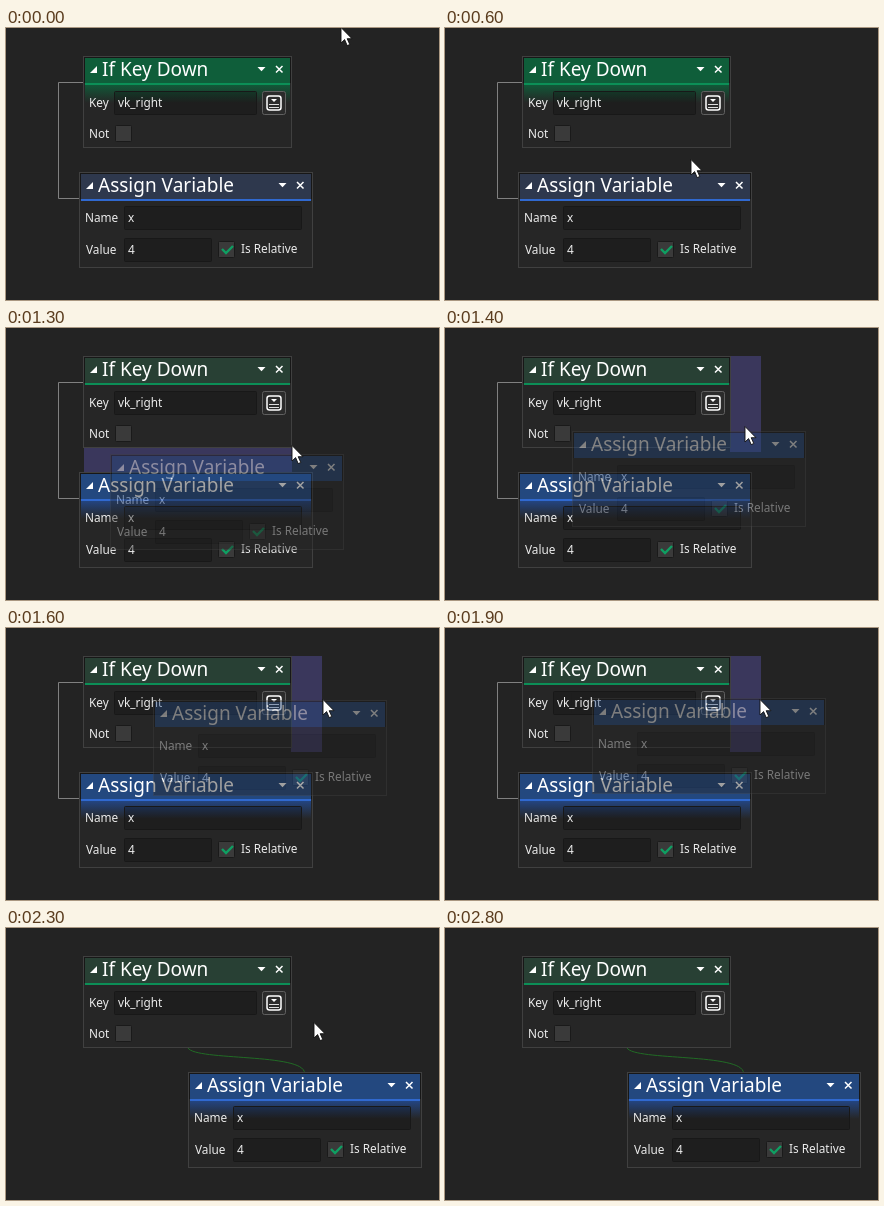
Write an HTML page that moves like this. It is 433 px wide and 272 px high and loops after 3200 ms.

```html
<!DOCTYPE html>
<html>
<head>
<meta charset="utf-8">
<style>
  html, body { margin: 0; width: 100%; height: 100%; overflow: hidden; background: #232323; }
  svg { display: block; }
  text { font: 11.8px "Noto Sans", "Open Sans", sans-serif; fill: #ececec; }
  .title { font-size: 19px; fill: #fff; }
  .icon { fill: #fff; }
  .stroke { fill: none; stroke: #fff; stroke-width: 1.5; }
  .thin { fill: none; stroke: #ddd; stroke-width: 1; }
  .field { fill: #000; fill-opacity: .22; stroke: #181818; }
  .check { fill: #3a3a3a; stroke: #1a1a1a; }
  .body { fill: #262626; stroke: #404040; }
  .edge { fill: #171717; }
  #keydown { --idle: #284034; --active: #0f5e3a; --accent: #0c8f57; }
  #assign { --idle: #2e384d; --active: #23487f; --accent: #3069d0; }
  #ghost { --lit: 0; opacity: .42; }
  .head { fill: var(--idle); }
  .selected .head { fill: var(--active); }
  .rule { fill: var(--accent); opacity: var(--lit, 1); }
  .glow { opacity: 0; }
  .selected .glow { opacity: var(--lit, 1); }
</style>
</head>
<body>
<svg id="stage" width="433" height="272" viewBox="0 0 433 272"></svg>
<script>
const rect = (cls, x, y, w, h, extra = '') =>
  `<rect class="${cls}" x="${x}" y="${y}" width="${w}" height="${h}" ${extra}/>`;
const label = (x, y, s, cls = '') => `<text class="${cls}" x="${x}" y="${y}">${s}</text>`;
const field = (x, y, w) => rect('field', x + .5, y + .5, w - 1, 23, 'rx="1"');
const checkbox = (x, y) => rect('check', x + .5, y + .5, 16, 16, 'rx="1"');
const gradient = (id, color) => `<linearGradient id="${id}" x2="0" y2="1">
  <stop stop-color="${color}"/><stop offset="1" stop-color="${color}" stop-opacity="0"/></linearGradient>`;

const block = (id, title, w, h, content) => `<g id="${id}">
  ${rect('body', -.5, .5, w + 1, h)}
  ${rect('edge', 0, 1, w, 26)}
  ${rect('head', 1, 2, w - 2, 25)}
  ${rect('glow', 1, 27, w - 2, 20, `fill="url(#${id}Glow)"`)}
  ${rect('rule', 1, 27, w - 2, 2)}
  <path class="icon" d="M13 10v7H6z"/>
  ${label(18, 20, title, 'title')}
  <path class="icon" d="M${w - 33.5} 11h8l-4 4.200z"/>
  <path class="stroke" d="M${w - 15} 10l6.500 6.500m0-6.500l-6.500 6.500"/>
  ${content}</g>`;

const keyDown = block('keydown', 'If Key Down', 207, 91,
  label(5, 51, 'Key') + field(30, 35, 143) + label(34, 51, 'vk_right') +
  rect('', 178.5, 35.5, 23, 23, 'rx="2" fill="#2b2b2b" stroke="#606060"') +
  `<rect class="stroke" x="183" y="40" width="14" height="14" rx="2.5"/>
   <path class="icon" d="M187 43h6l-3 3z"/>
   <path class="thin" d="M185 48.500h10m-10 3h10"/>` +
  label(5, 82, 'Not') + checkbox(31, 69));

const assign = block('assign', 'Assign Variable', 232, 95,
  label(5, 50, 'Name') + field(44, 34, 178) + label(48, 50, 'x') +
  label(6, 82, 'Value') + field(44, 66, 88) + label(48, 82, '4') +
  checkbox(138, 69) +
  '<path d="M142 77l4 4 7-7" fill="none" stroke="#0f9f62" stroke-width="2.4"/>' +
  label(161, 81, 'Is Relative'));

document.getElementById('stage').innerHTML = `
  <defs>${gradient('keydownGlow', '#0f5e3a')}${gradient('assignGlow', '#23488a')}</defs>
  <path id="link" fill="none" stroke="#808080" d="M78 54.500H52.500V170.500H74"/>
  <path id="curve" fill="none" stroke="#216b25" d="M182 120C190 133 298 125 298.500 145"/>
  <rect id="zone" fill="#3a375c"/>
  <g transform="translate(78 28)">${keyDown}</g>
  <g id="holder">${assign}</g>
  <use id="ghost" href="#assign"/>
  <path id="cursor" d="M0-.5V15l3.600-3.400 2.600 6 2.600-1.100-2.600-5.800H11z" fill="#fff" stroke="#111" stroke-width=".9"/>`;

const $ = id => document.getElementById(id);
const show = (id, on) => $(id).setAttribute('visibility', on ? 'visible' : 'hidden');
const move = (id, x, y) => $(id).setAttribute('transform', `translate(${Math.round(x)} ${Math.round(y)})`);

const LOOP = 3200, STEP = 100, LAST = 2800;
const PRESS = 1100, DRAG = 1300, DROP = 2300;
const HOME = [74, 144], GRAB = [242, 146];
// time, x, y of the pointer tip
const path = [
  [0, 335, 0], [500, 244, 124], [600, 246, 132], [1000, 242, 146], [1200, 242, 150],
  [1300, 286, 118], [1500, 314, 80], [1600, 317, 72], [1800, 317, 72],
  [2100, 311, 71], [2200, 310, 73], [2400, 306, 117], [2800, 296, 275]
];

function pointer(t) {
  const i = Math.max(1, path.findIndex(p => p[0] >= t));
  const [t0, x0, y0] = path[i - 1], [t1, x1, y1] = path[i];
  const k = (t - t0) / (t1 - t0);
  return [x0 + (x1 - x0) * k, y0 + (y1 - y0) * k];
}

function draw(now) {
  const t = Math.min(LAST, Math.floor(now % LOOP / STEP) * STEP);
  const dropped = t >= DROP, dragging = t >= DRAG && !dropped;

  $('keydown').classList.toggle('selected', t < PRESS);
  $('assign').classList.toggle('selected', t >= PRESS);
  move('holder', dropped ? 183 : HOME[0], HOME[1]);
  show('link', !dropped);
  show('curve', dropped);
  show('ghost', dragging);
  show('zone', dragging);

  if (dragging) {
    const [x, y] = pointer(t - 30); // the dragged copy trails the pointer slightly
    move('ghost', HOME[0] + x - GRAB[0], HOME[1] + y - GRAB[1]);
    const [zx, zy, w, h] = t < 1400 ? [78, 119, 208, 31] : [285, 28, 31, 96];
    Object.entries({ x: zx, y: zy, width: w, height: h })
      .forEach(([name, value]) => $('zone').setAttribute(name, value));
  }
  move('cursor', ...pointer(t));
  requestAnimationFrame(tick);
}

const start = performance.now();
const tick = () => draw(performance.now() - start);
tick();
</script>
</body>
</html>
```
